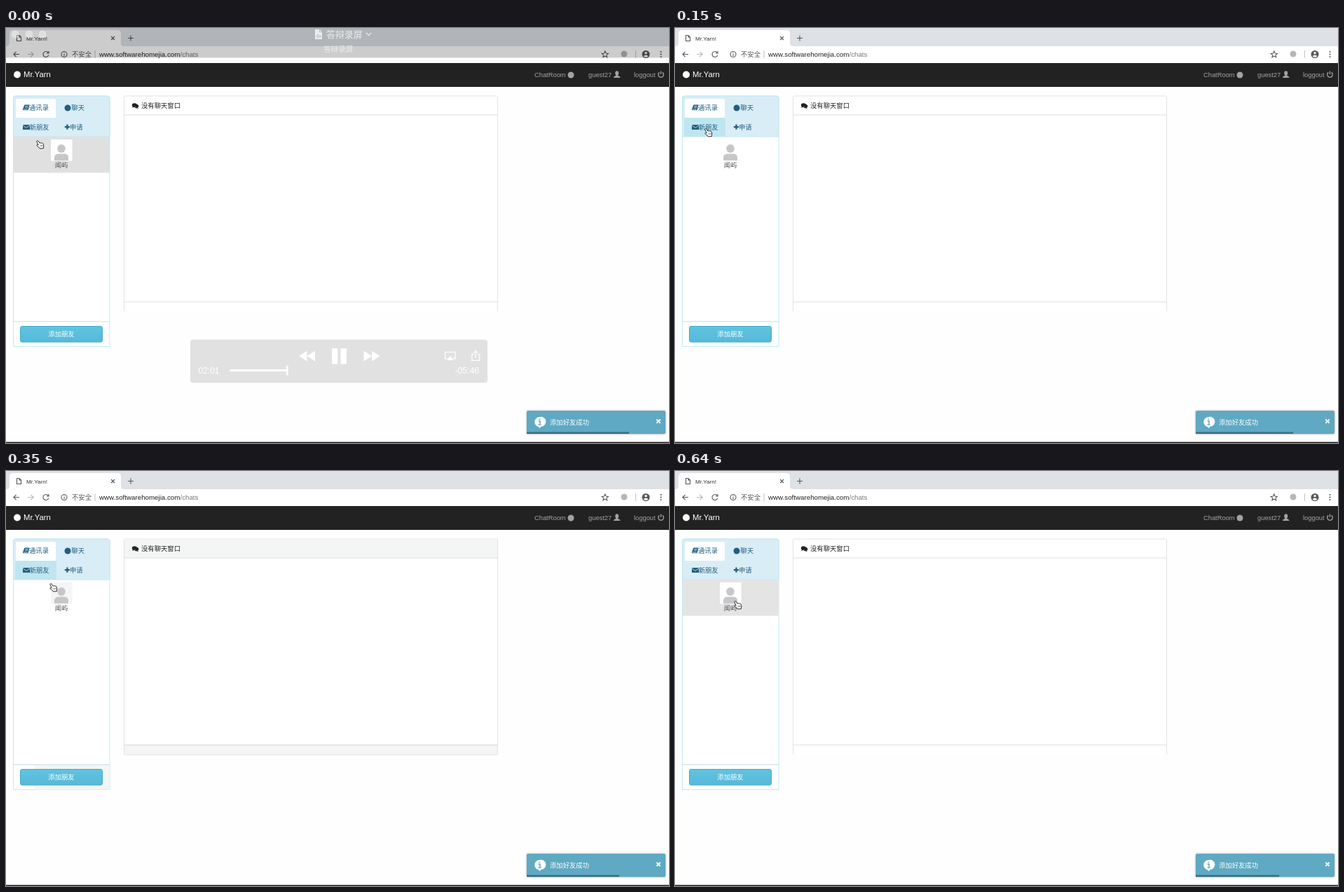
Recreate the animation shown at these times as an HTML page. Size 946 px wide and 592 px high, loop 740 ms.

```html
<!DOCTYPE html>
<html lang="zh-CN">
<head>
<meta charset="utf-8">
<title>Mr.Yarn!</title>
<style>
html, body { margin: 0; width: 100%; height: 100%; overflow: hidden; background: #fefefe; }
svg { display: block; width: 946px; height: 592px; }
text { font: 9.33px "Liberation Sans", "Noto Sans CJK SC", "Noto Sans CJK", sans-serif; }
.line { fill: none; stroke: #55585c; stroke-width: 1.1; }
.tabs text { fill: #215f80; font-weight: 500; }
.nav text { fill: #a3a3a3; }
.player, .hover, .row, .grey, .hand, .bar { animation: 740ms step-end infinite; }
.player { animation-name: player; }
.hover { animation-name: hover; }
.row { animation-name: row; }
.grey { animation-name: grey; }
.hand { animation-name: hand; }
.bar { animation-name: bar; }
@keyframes player { 0% { opacity: 1 } 20.27%, 100% { opacity: 0 } }
@keyframes hover { 0% { opacity: 0 } 20.27% { opacity: 1 } 86.486%, 100% { opacity: 0 } }
@keyframes row {
  0% { opacity: 1; fill: #e0e0e0 }
  20.27% { opacity: 0; fill: #e0e0e0 }
  86.486%, 100% { opacity: 1; fill: #e4e4e4 }
}
@keyframes grey { 0% { opacity: 0 } 47.297% { opacity: 1 } 86.486%, 100% { opacity: 0 } }
@keyframes hand {
  0% { transform: translate(43px, 160px) }
  20.27% { transform: translate(42px, 143px) }
  47.297% { transform: translate(62px, 160px) }
  86.486%, 100% { transform: translate(84px, 185px) }
}
@keyframes bar {
  0% { width: 146px }
  20.27% { width: 139px }
  47.297% { width: 132px }
  86.486%, 100% { width: 119px }
}
</style>
</head>
<body>
<svg viewBox="0 0 946 592">
  <defs>
    <filter id="shadow" x="-10%" y="-50%" width="120%" height="200%">
      <feDropShadow dx="0" dy="0" stdDeviation="1.6" flood-color="#777" flood-opacity=".7"/>
    </filter>
    <linearGradient id="btn" x2="0" y2="1">
      <stop stop-color="#60c3e0"/><stop offset="1" stop-color="#56b9d8"/>
    </linearGradient>
  </defs>
  <rect width="946" height="592" fill="#fefefe"/>

  <!-- browser -->
  <rect width="946" height="26" fill="#dee1e6"/>
  <rect y="26" width="946" height="24" fill="#fff"/>
  <path d="M0 26Q5 26 5 21V8Q5 3 10 3H159Q164 3 164 8V21Q164 26 169 26Z" fill="#fff"/>
  <path class="line" d="M15.5 10.5H19L21.5 13V18.5H15.5ZM19 10.5V13H21.5M150 12L155 17M155 12L150 17M174 14.5H182M178 10.5V18.5"/>
  <text x="29" y="17.5" style="font-size:8.1px" fill="#333">Mr.Yarn!</text>
  <g class="line">
    <path d="M19 37.5H11M14.6 33.8L10.9 37.5L14.6 41.2"/>
    <path d="M31 37.5H39M35.4 33.8L39.1 37.5L35.4 41.2" stroke="#b4b6b9"/>
    <path d="M60.2 35.1A4 4 0 1 0 60.8 38.6M61 33V36H58"/>
    <circle cx="83" cy="37.5" r="4"/>
    <path d="M83 37V40M83 35V36"/>
    <path d="M127 32V43M898.5 32V43" stroke="#c4c6c9"/>
    <path d="M854.8 33L856.1 36.1L859.4 36.4L856.9 38.6L857.7 41.8L854.8 40.1L851.9 41.8L852.7 38.6L850.2 36.4L853.5 36.1Z"/>
  </g>
  <text x="94" y="41" fill="#55585c">不安全</text>
  <text x="133" y="41" style="font-size:9.75px" fill="#222">www.softwarehomejia.com<tspan fill="#777">/chats</tspan></text>
  <circle cx="882" cy="37" r="4.5" fill="#b6b6b6"/>
  <circle cx="913" cy="37.5" r="5.5" fill="#55585c"/>
  <circle cx="913" cy="35.6" r="1.7" fill="#fff"/>
  <path d="M909.6 40.2Q913 36.9 916.4 40.2Q913 43.4 909.6 40.2Z" fill="#fff"/>
  <path d="M934.5 33V42" stroke="#55585c" stroke-width="1.8" stroke-dasharray="1.8"/>

  <!-- navigation -->
  <rect y="50" width="946" height="34" fill="#222"/>
  <circle cx="16" cy="66.5" r="5" fill="#fff"/>
  <text x="25" y="70.3" style="font-size:11.3px" fill="#fff">Mr.Yarn</text>
  <g class="nav" fill="#a3a3a3">
    <text x="754" y="70">ChatRoom</text>
    <circle cx="806" cy="67" r="4.5"/>
    <text x="831" y="70">guest27</text>
    <ellipse cx="871.7" cy="64.4" rx="2.5" ry="3.1"/>
    <path d="M867 71Q867 68.8 870.3 68V66H873.1V68Q876.4 68.8 876.4 71Z"/>
    <text x="896" y="70">loggout</text>
    <path d="M932.3 63.4A3.8 3.8 0 1 0 936.7 63.4M934.5 61.5V66" fill="none" stroke="#a3a3a3" stroke-width="1.3"/>
  </g>

  <!-- contacts -->
  <path d="M10.5 454.5V100Q10.5 97 13.5 97H145Q148 97 148 100V454.5Z" fill="#fff" stroke="#c5e9f0"/>
  <path d="M10.5 155V100Q10.5 97 13.5 97H145Q148 97 148 100V155Z" fill="#d9edf7" stroke="#bfe7f0"/>
  <path d="M14 128V103Q14 101 16 101H69Q71 101 71 103V128Z" fill="#fff"/>
  <rect class="hover" x="13" y="128" width="59" height="27" rx="2" fill="#bfe6f0"/>
  <g class="tabs" fill="#215f80">
    <path d="M26.5 109.5H33.5L31.6 117.3H24.8Q23.3 117 24.2 115.3Z"/>
    <path d="M27.5 111.5H31.5M27 113.3H31M25 116H30.7" stroke="#fff" stroke-width=".7"/>
    <text x="33" y="117.3">通讯录</text>
    <circle cx="88" cy="114" r="4.5"/>
    <text x="93.3" y="117.3">聊天</text>
    <path d="M24 138H34V145H24Z"/>
    <path d="M24 138.7L29 142.5L34 138.7" fill="none" stroke="#d9edf7" stroke-width=".8"/>
    <text x="33.7" y="144.5">新朋友</text>
    <path d="M86.3 137.5H88.5V140H91V142.2H88.5V144.7H86.3V142.2H83.8V140H86.3Z"/>
    <text x="91" y="144.5">申请</text>
  </g>
  <rect class="row" x="11" y="155" width="137" height="51.5" fill="#e0e0e0"/>
  <rect x="64" y="159" width="30.5" height="30.5" fill="#fff"/>
  <rect class="grey" x="64" y="159" width="30.5" height="30.5" fill="#f5f5f5"/>
  <ellipse cx="79" cy="172" rx="5.8" ry="6" fill="#c7c7ca"/>
  <path d="M69 189V185Q69 179.5 75 179.5H83Q89 179.5 89 185V189Z" fill="#c7c7ca"/>
  <text x="79" y="199" text-anchor="middle" fill="#555">闻屿</text>
  <rect class="grey" x="41" y="419" width="106.5" height="35.5" fill="#f4f5f5"/>
  <path d="M10 418.8H148" stroke="#c3dfe6"/>
  <rect x="20.5" y="425.5" width="117" height="22.5" rx="2.5" fill="url(#btn)" stroke="#45abc9"/>
  <text x="79" y="440.3" text-anchor="middle" fill="#fff" font-weight="500">添加朋友</text>

  <!-- conversation -->
  <path d="M168.5 404V99Q168.5 97 170.5 97H699.5Q701.5 97 701.5 99V404" fill="#fff" stroke="#e1e3e3"/>
  <g class="grey">
    <path d="M169 124V99Q169 97.5 170.5 97.5H699.5Q701 97.5 701 99V124Z" fill="#f4f6f5"/>
    <path d="M168.5 391V403Q168.5 405 170.5 405H699.5Q701.5 405 701.5 403V391Z" fill="#f5f5f5" stroke="#e1e3e3"/>
  </g>
  <path d="M168 124H702M168 390.8H702" stroke="#dcdfdf"/>
  <g fill="#222">
    <path d="M186 108.5Q189.5 109.3 189.3 111.7Q189.1 113 188 113.5L189 115L186.3 114.2Q184 114.3 183.2 113.4Q187 112.5 186 108.5Z"/>
    <ellipse cx="183.3" cy="110" rx="3.5" ry="2.8"/>
    <path d="M181 111L180.4 114L184 112Z"/>
    <text x="193" y="113.6">没有聊天窗口</text>
  </g>

  <!-- toast -->
  <rect x="743" y="546" width="198" height="33" rx="2" fill="#5fa9c3" filter="url(#shadow)"/>
  <rect class="bar" x="743" y="576.3" width="146" height="2.7" fill="#3b7385"/>
  <path d="M761 555A7 7 0 1 1 763.5 568.6L761.5 571L760 568.9A7 7 0 0 1 761 555Z" fill="#fff"/>
  <path d="M759.5 560.7H762V565.5M759.5 565.7H763.5M760.4 558.3H762.2" fill="none" stroke="#5fa9c3" stroke-width="1.5"/>
  <text x="776" y="566" fill="#fff" font-weight="500">添加好友成功</text>
  <path d="M928.3 558.3L933.7 563.7M933.7 558.3L928.3 563.7" stroke="#fff" stroke-width="1.9"/>

  <path d="M0 591.3H946" stroke="#222" stroke-width="1.4"/>

  <!-- video player overlay -->
  <g class="player" fill="#fff">
    <rect width="946" height="42.5" fill="#000" opacity=".2"/>
    <g opacity=".4">
      <circle cx="13" cy="9" r="5.5"/><circle cx="33" cy="9" r="5.5"/><circle cx="52" cy="9" r="5.5"/>
    </g>
    <g fill="#ececec">
      <path d="M441 2H447.5L451 5.5V16H441Z"/>
      <path d="M447.3 2V5.7H451M443 13L445 9L447 11.5L448 10.5L449.3 13Z" fill="none" stroke="#b5b7ba" stroke-width=".9"/>
      <text x="457" y="13.7" style="font-size:12.9px">答辩录屏</text>
      <path d="M514 7L517.5 10.5L521 7" fill="none" stroke="#ececec" stroke-width="1.2"/>
      <text x="453" y="34.2" style="font-size:10.6px">答辩录屏</text>
    </g>
    <rect x="263" y="444.5" width="424" height="61.5" rx="4" fill="#e1e1e1"/>
    <path d="M418 468L429.5 460.5V475.5ZM429.5 468L441 460.5V475.5ZM465 457H473.3V479.5H465ZM477.5 457H485.8V479.5H477.5ZM510.5 460.5L522 468L510.5 475.5ZM522 460.5L533.5 468L522 475.5Z"/>
    <path d="M629.5 471.5H626.5V462.3H641V471.5H638M667.5 465.5H664.8V474.3H675.5V465.5H672.8M670.1 471V461M667.2 463.5L670.1 460.6L673 463.5" fill="none" stroke="#fff" stroke-width="1.3"/>
    <path d="M633.8 468L639 474H628.5Z"/>
    <text x="274.5" y="493" style="font-size:12px" font-weight="500">02:01</text>
    <text x="675" y="493" style="font-size:12.2px" text-anchor="end">-05:46</text>
    <rect x="319" y="487" width="82" height="3" rx="1.5"/>
    <rect x="400" y="481.5" width="2.6" height="14" rx="1"/>
  </g>

  <g class="hand">
    <path d="M.7 1.8Q1.2 .2 2.8 .9L5 4.2Q6 3.4 6.9 4.1Q7.9 3.3 8.7 4.3Q9.8 4 10.2 5.3Q11.2 8 10.4 10.2L10.5 11.6L5.5 12L4.8 10.8Q2 9.6 .7 7.2Q.9 5.9 3.2 7Z" fill="#fff" stroke="#222" stroke-width=".95" stroke-linejoin="round"/>
    <path d="M5.6 7.2L6.2 9.3M7.2 6.9L7.7 9M8.8 6.7L9.1 8.7" stroke="#333" stroke-width=".6"/>
  </g>
</svg>
</body>
</html>
```
